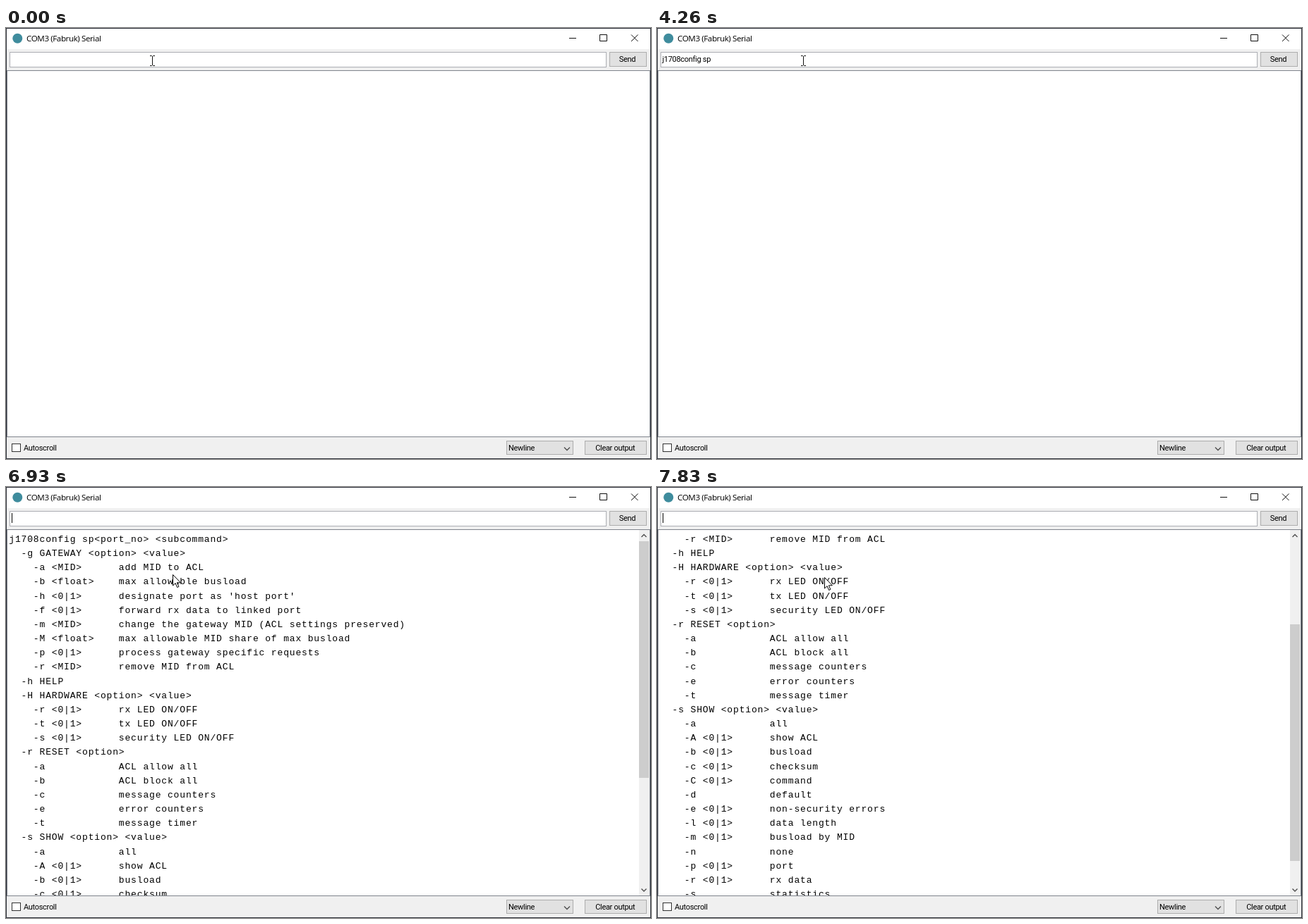
Write an HTML page that moves like this. It is 914x612 px and loops after 8000 ms.

```html
<!DOCTYPE html>
<html lang="en">
<head>
<meta charset="utf-8">
<title>Serial monitor</title>
<style>
  html, body { margin: 0; width: 100%; height: 100%; overflow: hidden; background: #f0f0f0; }
  svg { display: block; }
  text { fill: #000; white-space: pre; }
  .title { font: 11.6px "Open Sans", "Noto Sans", sans-serif; letter-spacing: -.4px; }
  .ui { font: 11px Roboto, "Liberation Sans", sans-serif; letter-spacing: -.3px; }
  .mono { font: 13px "Liberation Mono", monospace; letter-spacing: .84px; }
  .mid { text-anchor: middle; }
  .button { fill: #e1e1e1; stroke: #adadad; }
  .line { fill: none; stroke: #111; }
  .chevron { fill: none; stroke: #505050; stroke-width: 1.4; }
</style>
</head>
<body>
<svg width="914" height="612" viewBox="0 0 914 612">
  <rect width="914" height="612" fill="#f0f0f0"/>
  <rect width="914" height="30" fill="#fff"/>

  <circle cx="16.3" cy="14.7" r="7" fill="#3f8c9d"/>
  <text class="title" x="29" y="19">COM3 (Fabruk) Serial</text>
  <path class="line" d="M798 14.5h10M841.5 9.5h10v9h-10zM886 9.5l9.5 9.5m0-9.5l-9.5 9.5"/>

  <rect x="5.5" y="34.5" width="845" height="21" fill="#fff" stroke="#abadb3"/>
  <text class="ui" id="typed" x="7.5" y="48"></text>
  <rect id="caret" y="37" width="1" height="14"/>
  <rect class="button" x="855.5" y="34.5" width="52" height="20"/>
  <text class="ui mid" x="880.5" y="48">Send</text>

  <rect x="1.5" y="60.5" width="911" height="520" fill="#fff" stroke="#7f848c"/>
  <g id="output">
    <svg x="2" y="61" width="895" height="519" viewBox="2 61 895 519">
      <g id="rows"></g>
    </svg>
    <rect x="897" y="61" width="15" height="519" fill="#f0f0f0"/>
    <rect id="thumb" x="897" y="77" width="14" height="336" fill="#cdcdcd"/>
    <path class="chevron" d="M900.5 71l3.5-3.5 3.5 3.5M900.5 570.5l3.5 3.5 3.5-3.5"/>
  </g>

  <rect x="8.5" y="590.5" width="12" height="11" fill="#fff" stroke="#333"/>
  <text class="ui" x="25" y="600">Autoscroll</text>
  <rect class="button" x="709.5" y="586.5" width="94" height="19"/>
  <text class="ui" x="712" y="600">Newline</text>
  <path class="chevron" d="M791 595.5l4 4 4-4"/>
  <rect class="button" x="820.5" y="586.5" width="87" height="19"/>
  <text class="ui mid" x="863.3" y="600">Clear output</text>

  <rect x=".5" y=".5" width="913" height="611" fill="none" stroke="#2c2f38"/>

  <path id="beam" class="line" d="M-3.5-6.5h2.5l1 1 1-1h2.5M-3.5 7.5h2.5l1-1 1 1h2.5M0-6v13"/>
  <path id="arrow" d="M.5.5v15.5l3.6-3.4 2.5 5.9 2.3-1-2.5-5.7h5z" fill="#fff" stroke="#000"/>
</svg>
<script>
const LOOP = 8000, ROW = 20.16, SENT = 5600;
const $ = id => document.getElementById(id);

const command = 'j1708config sp1 -h';
const keyTimes = [520, 800, 960, 1010, 1210, 1940, 2060, 2480, 2680,
  2790, 2920, 3110, 3610, 3770, 4360, 4560, 4770, 5090];
const caretX = [8, 11, 16, 22, 28, 34, 39, 44, 50, 54, 56, 61, 64, 69, 75, 81, 84, 87, 93];
const caretOff = [[0, 420], [1700, 1940], [4260, 4360], [5570, 5600], [6080, 6560], [7140, 7620]];
const scrolls = [[0, 0], [7140, 3], [7310, 6], [7600, 9]];

// Mouse path: leaves the field, settles on the text, then drifts.
const move = { from: [207, 46], to: [236, 124], start: 6600, end: 6930, steps: 8 };
const drift = [[0, 0, 0], [7430, 0, 2], [7650, 1, 4]];

// Indent | flag | description
const help = `0|j1708config sp<port_no> <subcommand>
2|-g GATEWAY <option> <value>
4|-a <MID>|add MID to ACL
4|-b <float>|max allowable busload
4|-h <0/1>|designate port as 'host port'
4|-f <0/1>|forward rx data to linked port
4|-m <MID>|change the gateway MID (ACL settings preserved)
4|-M <float>|max allowable MID share of max busload
4|-p <0/1>|process gateway specific requests
4|-r <MID>|remove MID from ACL
2|-h HELP
2|-H HARDWARE <option> <value>
4|-r <0/1>|rx LED ON/OFF
4|-t <0/1>|tx LED ON/OFF
4|-s <0/1>|security LED ON/OFF
2|-r RESET <option>
4|-a|ACL allow all
4|-b|ACL block all
4|-c|message counters
4|-e|error counters
4|-t|message timer
2|-s SHOW <option> <value>
4|-a|all
4|-A <0/1>|show ACL
4|-b <0/1>|busload
4|-c <0/1>|checksum
4|-C <0/1>|command
4|-d|default
4|-e <0/1>|non-security errors
4|-l <0/1>|data length
4|-m <0/1>|busload by MID
4|-n|none
4|-p <0/1>|port
4|-r <0/1>|rx data
4|-s|statistics`;

help.split('\n').forEach((line, i) => {
  const [indent, flag, note = ''] = line.split('|');
  const left = ' '.repeat(indent) + flag.replace('0/1', '0|1');
  const text = document.createElementNS('http://www.w3.org/2000/svg', 'text');
  text.setAttribute('class', 'mono');
  text.setAttribute('x', 4.3);
  text.setAttribute('y', 78 + i * ROW);
  text.textContent = note ? left.padEnd(18) + note : left;
  $('rows').append(text);
});

const latest = (table, t) => table.filter(step => step[0] <= t).pop();
const show = (id, on) => $(id).setAttribute('visibility', on ? 'visible' : 'hidden');
const place = (id, x, y) => $(id).setAttribute('transform', `translate(${x} ${y})`);

function mouseAt(t) {
  const { from, to, start, end, steps } = move;
  const raw = (t - start) / (end - start) * (steps - 1);
  const p = Math.max(0, Math.min(1, (Math.floor(raw) + 1) / steps));
  const eased = p * p * (3 - 2 * p);
  const [, dx, dy] = latest(drift, t);
  return [0, 1].map(i => Math.round(from[i] + (to[i] - from[i]) * eased) + [dx, dy][i]);
}

function draw(now) {
  const t = now % LOOP;
  const sent = t >= SENT;
  const count = sent ? 0 : keyTimes.filter(k => k <= t).length;
  $('typed').textContent = command.slice(0, count);
  $('caret').setAttribute('x', caretX[count]);
  show('caret', !caretOff.some(([a, b]) => t >= a && t < b));

  const rows = latest(scrolls, t)[1];
  show('output', sent);
  place('rows', 0, -rows * ROW);
  $('thumb').setAttribute('y', Math.round(77 + rows * 13.06));

  const [x, y] = mouseAt(t);
  const inField = y < 57;
  show('beam', inField);
  show('arrow', !inField);
  place('beam', x + .5, y);
  place('arrow', x, y);
}

function tick() {
  draw(performance.now());
  requestAnimationFrame(tick);
}
tick();
</script>
</body>
</html>
```
